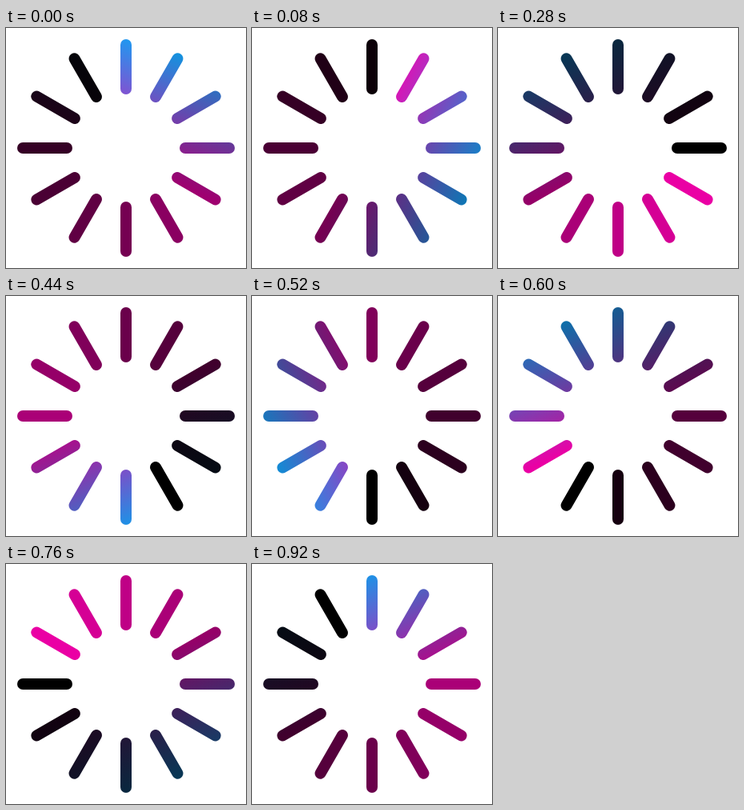
These frames come from a looping animation (300 by 300 pixels, 0.96 s). An HTML page with a canvas:

```html
<!DOCTYPE html>
<html lang="en">
<head>
<meta charset="utf-8">
<title>Spinner</title>
<style>
  html, body { margin: 0; width: 100%; height: 100%; overflow: hidden; background: #fff; }
  canvas { display: block; width: 300px; height: 300px; }
</style>
</head>
<body>
<canvas id="stage" width="300" height="300"></canvas>
<script>
const ctx = document.getElementById('stage').getContext('2d');
const LOOP = 960, STEP = 40, BARS = 12;
const PINK = [255, 0, 179], BLUE = [20, 168, 255];
const INNER = 74, OUTER = 129;
const TAU = Math.PI * 2;

const shade = (color, level) => `rgb(${color.map(c => Math.round(c * level)).join(',')})`;

// Angles run clockwise from twelve o'clock.
const polar = (angle, r) => [150 + r * Math.sin(angle), 150 - r * Math.cos(angle)];

function draw(time) {
  const t = Math.floor((time % LOOP) / STEP) * STEP;
  // The blue side circles three times per loop.
  const tilt = TAU * (3 * t / LOOP + 1 / 16);

  ctx.fillStyle = '#fff';
  ctx.fillRect(0, 0, 300, 300);
  ctx.lineWidth = 14;
  ctx.lineCap = 'round';

  for (let i = 0; i < BARS; i++) {
    // Each bar brightens over one loop, then drops to black.
    const level = ((t - i * LOOP / BARS - STEP + 2 * LOOP) % LOOP) / LOOP;
    const paint = ctx.createLinearGradient(...polar(tilt, -18), ...polar(tilt, 135));
    paint.addColorStop(0, shade(PINK, level));
    paint.addColorStop(1, shade(BLUE, level));

    const angle = TAU * i / BARS;
    ctx.strokeStyle = paint;
    ctx.beginPath();
    ctx.moveTo(...polar(angle, INNER));
    ctx.lineTo(...polar(angle, OUTER));
    ctx.stroke();
  }
}

function tick() {
  draw(performance.now());
  requestAnimationFrame(tick);
}
tick();
</script>
</body>
</html>
```
